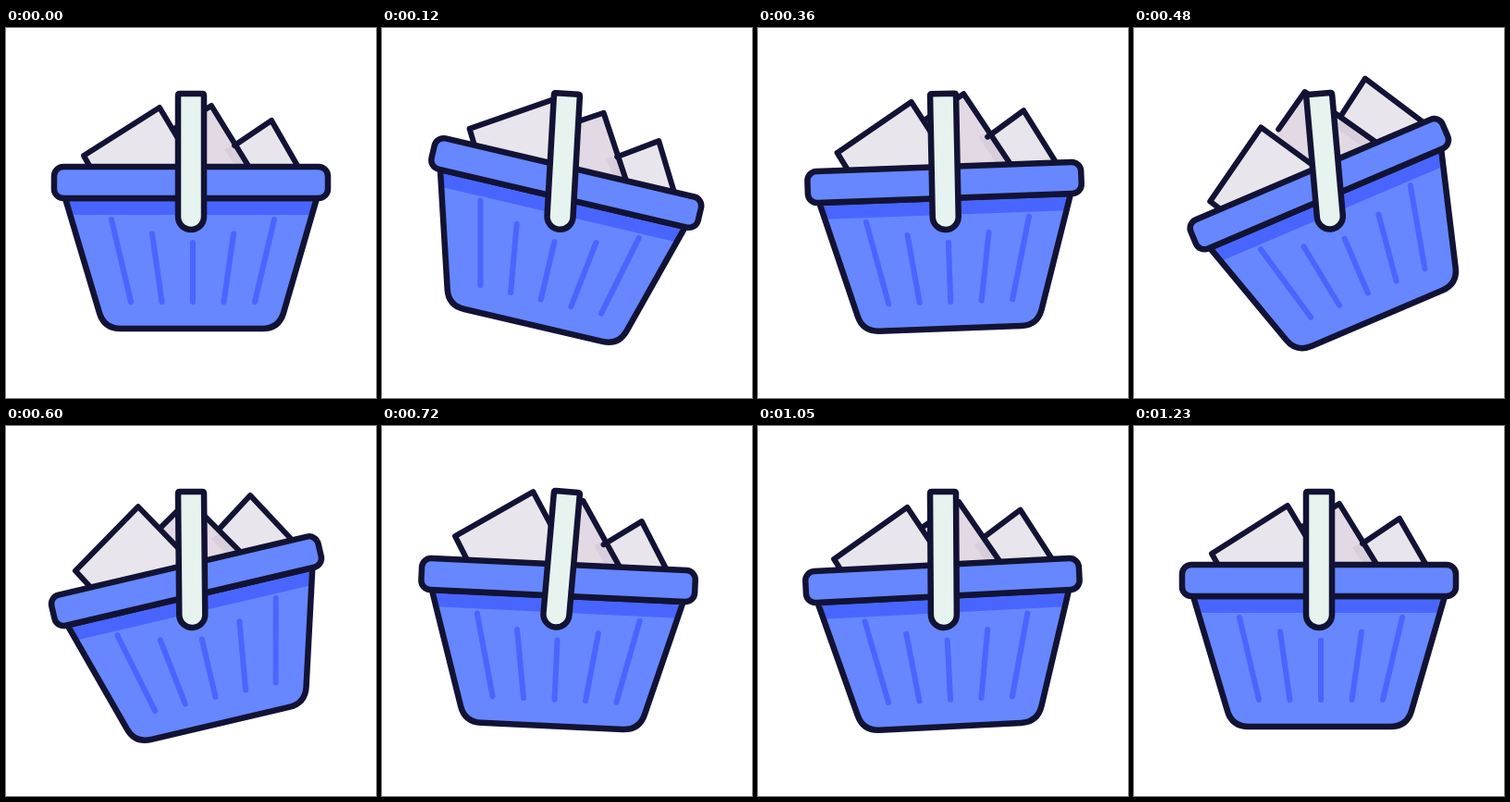
Write an HTML page that moves like this. It is 400 by 400 pixels and loops after 3260 ms.

```html
<!DOCTYPE html>
<html lang="en">
<head>
<meta charset="utf-8">
<title>Swinging basket</title>
<style>
  html, body { margin: 0; width: 100%; height: 100%; overflow: hidden; background: #fff; }
  svg { display: block; width: 100vw; height: 100vh; }
  .line { stroke: #121334; stroke-width: 6.5; stroke-linejoin: round; stroke-linecap: round; }
  .thin { stroke-width: 6; }
  .open { fill: none; }
  .paper { fill: #e9e5ed; }
  .blue { fill: #6687ff; }
  #ribs { fill: none; stroke: #4866ff; stroke-width: 6; stroke-linecap: round; }
</style>
</head>
<body>
<svg viewBox="0 0 400 400">
  <defs>
    <path id="body" d="M64 184 L101 308 Q106 325 124 325 H277 Q295 325 300 308 L336 184 Z"/>
  </defs>
  <g id="swing">
    <g id="basket">
      <path class="paper right" d="M247 127 L287 100 L333 180 H278 Z"/>
      <g class="mid">
        <path fill="#e2d9e4" d="M180 110 L222 84 L278 175 L205 182 L172 118 Z"/>
        <path fill="#d9cfdc" d="M236 131 L248 126 L278 175 H264 Z"/>
        <path class="line thin open" d="M180 110 L222 84 L278 175"/>
      </g>
      <path class="line thin open right" d="M247 127 L287 100 L333 180"/>
      <path class="paper line thin left" d="M109 182 L84 138 L166 86 L222 180"/>
      <use href="#body" class="blue"/>
      <path fill="#4866ff" d="M64 184 H336 L331 202 H69 Z"/>
      <path id="ribs"/>
      <use href="#body" class="line open"/>
      <rect class="blue line" x="52" y="150" width="296" height="34" rx="10"/>
    </g>
    <path class="line" fill="#e6f3ef" d="M186 73 Q186 71 188 71 H212 Q214 71 214 73 V204 A14 14 0 0 1 186 204 Z"/>
  </g>
</svg>
<script>
const LOOP = 3260, STEP = 30, END = 1230;
const BEAT = 270, HOP = 430;

const clamp = (v, lo, hi) => Math.max(lo, Math.min(hi, v));
const ease = x => (1 - Math.cos(Math.PI * x)) / 2;

// Eases between swing extremes that lie one beat apart, at rest on both ends.
function sway(t, lag, extremes) {
  const time = i => clamp(lag + i * BEAT, 0, END);
  const i = clamp(Math.floor((t - lag) / BEAT), 0, extremes.length - 2);
  const x = clamp((t - time(i)) / (time(i + 1) - time(i)), 0, 1);
  return extremes[i] + (extremes[i + 1] - extremes[i]) * ease(x);
}

// Two equal hops, one after the other.
function hop(t, start, height) {
  const x = clamp((t - start) / HOP, 0, 2);
  return height * Math.sin(Math.PI * x) ** 2;
}

function place(selector, value) {
  for (const el of document.querySelectorAll(selector)) el.setAttribute('transform', value);
}

function lift(selector, h) {
  place(selector, `translate(${h * 0.18} ${-h})`);
}

function draw(now) {
  const t = Math.min(Math.floor((now % LOOP) / STEP) * STEP, END);
  const handle = sway(t, -65, [0, 5.1, -5.1, 5.2, -0.4, 0]);
  const tilt = sway(t, -52, [0, 22.8, -23.2, 4, -3, 0]);
  place('#swing', `rotate(${handle} 200 71)`);
  place('#basket', `rotate(${tilt - handle} 200 194)`);
  lift('.left', hop(t, 40, 14));
  lift('.mid', hop(t, 220, 16.5));
  lift('.right', hop(t, 265, 18.5));
}

// Ribs fan out from the middle one.
let ribs = '';
for (let i = -2; i <= 2; i++) {
  const top = 232 - 9.5 * Math.abs(i) ** 1.4;
  ribs += `M${202 + 44 * i} ${top} L${202 + 33.5 * i} 296 `;
}
document.getElementById('ribs').setAttribute('d', ribs);

const start = performance.now();
function tick() {
  draw(performance.now() - start);
  requestAnimationFrame(tick);
}
tick();
</script>
</body>
</html>
```
